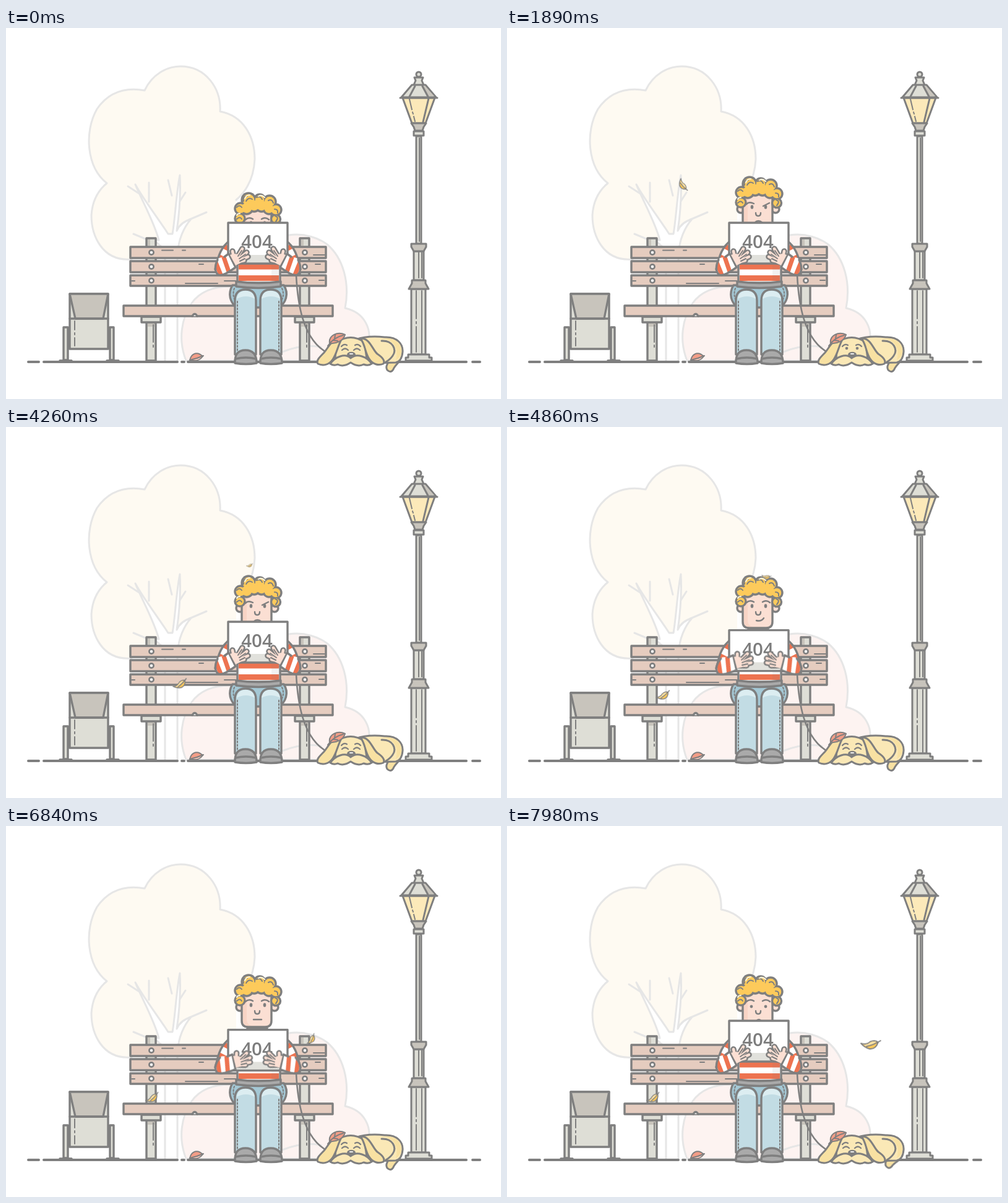
Animation, 800 px wide and 600 px high, one loop 8000 ms. Source, as an HTML page:

```html
<!DOCTYPE html>
<html lang="en">
<head>
<meta charset="utf-8">
<title>Park bench 404</title>
<style>
html, body { margin: 0; width: 100%; height: 100%; overflow: hidden; background: #fff; }
svg { display: block; width: 100vw; height: 100vh; }
.ink { stroke: #7f7f7f; stroke-width: 3.4; stroke-linecap: round; stroke-linejoin: round; fill: none; }
.thin { stroke-width: 2; }
.pale { stroke: #e6e6e6; stroke-width: 3; stroke-linecap: round; stroke-linejoin: round; fill: none; }
.wood { fill: #e5ccbf; } .metal { fill: #deded6; } .dark { fill: #c8c4bc; }
.skin { fill: #fbdfd3; } .denim { fill: #c2dce4; } .shade { fill: #a4c8d5; }
.shoe { fill: #aaa; } .fur { fill: #fae8b6; } .ear { fill: #f8e1a2; }
.glow { fill: #fce9b9; } .rust { fill: #f39d87; } .gold { fill: #fdca5b; }
.white { fill: #fff; } .none { stroke: none; }
.dot { fill: #7f7f7f; stroke: none; }
.red { stroke: #ed7350; fill: none; }

.move { animation: 8s linear infinite both; }
.head { animation-name: rise; }
.sign { animation-name: lower; }
.forearm { animation-name: swing; transform-origin: 345px 390px; }
.tail { animation-name: wag; transform-origin: 632px 532px; }
.nose { animation-name: sniff; }
.leaf1 { animation-name: fall1; }
.leaf2 { animation-name: fall2; }
.step { animation: 8s step-end infinite both; }
.calm { animation-name: calm; } .cross { animation-name: cross; }
.smirk { animation-name: smirk; } .flat { animation-name: flat; }
.eyes { animation-name: eyes; } .startled { animation-name: startled; }
.asleep { animation-name: asleep; } .awake { animation-name: awake; }

@keyframes rise {
  0%, 2.5% { transform: translateY(26px); animation-timing-function: ease-in-out; }
  9%, 100% { transform: none; }
}
@keyframes lower {
  0%, 55% { transform: none; animation-timing-function: ease-in-out; }
  62%, 86.5% { transform: translateY(14.5px); animation-timing-function: ease-in-out; }
  91%, 100% { transform: none; }
}
@keyframes swing {
  0%, 55% { transform: none; animation-timing-function: ease-in-out; }
  62%, 86.5% { transform: rotate(14.5deg); animation-timing-function: ease-in-out; }
  91%, 100% { transform: none; }
}
@keyframes wag {
  0%, 92% { transform: none; }
  95% { transform: rotate(14deg); }
  97.5% { transform: none; }
  100% { transform: rotate(13deg); }
}
@keyframes sniff {
  0%, 15%, 19%, 26%, 30%, 36%, 42%, 46%, 100% { transform: none; }
  17%, 28%, 39%, 44% { transform: translateY(-1px); }
}
@keyframes calm { 0% { opacity: 1; } 13% { opacity: 0; } 56% { opacity: 1; } }
@keyframes cross { 0% { opacity: 0; } 13% { opacity: 1; } 56% { opacity: 0; } }
@keyframes smirk { 0% { opacity: 0; } 56% { opacity: 1; } 79% { opacity: 0; } }
@keyframes flat { 0%, 79% { opacity: 0; } 79.01% { opacity: 1; } 93% { opacity: 0; } }
@keyframes eyes { 0% { opacity: 1; } 93% { opacity: 0; } }
@keyframes startled { 0% { opacity: 0; } 93% { opacity: 1; } }
@keyframes asleep { 0% { opacity: 1; } 16% { opacity: 0; } 45% { opacity: 1; } }
@keyframes awake { 0% { opacity: 0; } 16% { opacity: 1; } 45% { opacity: 0; } }
@keyframes fall1 {
  0% { transform: translate(284px, 163px) rotate(0deg) scale(0); }
  10% { transform: translate(286px, 195px) rotate(-25deg) scale(.3); }
  15.5% { transform: translate(270px, 219px) rotate(5deg) scale(.5); }
  20% { transform: translate(274px, 240px) rotate(40deg) scale(.65); }
  23.625% { transform: translate(284px, 254px) rotate(68deg) scale(.68); }
  30% { transform: translate(256px, 290px) rotate(35deg) scale(.72); }
  37.125% { transform: translate(225px, 330px) rotate(2deg) scale(.75); }
  41% { transform: translate(252px, 357px) rotate(-12deg) scale(.76); }
  48% { transform: translate(285px, 397px) rotate(-30deg) scale(.77); }
  53.25% { transform: translate(282px, 416px) rotate(-24deg) scale(.77); }
  61% { transform: translate(252px, 435px) rotate(-20deg) scale(.74); }
  68%, 100% { transform: translate(237px, 440px) rotate(-26deg) scale(.74); }
}
@keyframes fall2 {
  0%, 34% { transform: translate(358px, 181px) scale(0); }
  37.125% { transform: translate(362px, 188px) scale(.1); }
  41% { transform: translate(367px, 200px) rotate(20deg) scale(.18); }
  53.25% { transform: translate(394px, 224px) rotate(-14deg) scale(.33); }
  61% { transform: translate(420px, 243px) rotate(12deg) scale(.48); }
  71.25% { transform: translate(466px, 273px) rotate(0deg) scale(.64); }
  78.5% { transform: translate(496px, 306px) rotate(-22deg) scale(.66); }
  85.5% { transform: translate(494px, 345px) rotate(-48deg) scale(.6); }
  91.3% { transform: translate(515px, 368px) rotate(-26deg) scale(.8); }
  100% { transform: translate(590px, 353px) rotate(0deg) scale(1); }
}
</style>
</head>
<body>
<svg viewBox="0 0 800 600" preserveAspectRatio="none">
  <defs>
    <clipPath id="sleeve"><path d="M360 365L371 387C361 394 350 402 343 399C336 394 338 382 344 372Q350 371 360 365Z"/></clipPath>
    <clipPath id="upper"><path d="M366 341C352 349 344 364 341 380L338 393L350 400L368 390Z"/></clipPath>
    <g id="leaf" class="ink thin">
      <path class="gold" d="M-16-2Q-7 1-1-4.500Q7-8 12-3.500Q8 8-2 7Q-10 5-16-2Z"/>
      <path class="none" fill="#fde3a5" d="M-14-1Q-7 2-1-3.500Q5-6 9-4Q2 2-7 3Z"/>
      <path d="M-7 3Q4 1 16-6"/>
    </g>
  </defs>

  <!-- tree and bush -->
  <path class="none" fill="#fefaf2" d="M195 374C155 376 138 335 138 303Q140 270 163 251C130 225 126 168 147 131Q174 92 224 101C236 75 260 62 282 62C323 62 348 98 346 135C384 142 402 176 402 212Q400 254 372 278V374Z"/>
  <path class="pale" d="M203 374C155 378 138 335 138 303Q140 270 163 251C130 225 126 168 147 131Q174 92 224 101C236 75 260 62 282 62C323 62 348 98 346 135C384 142 402 176 402 212Q400 254 372 278"/>
  <path class="pale" d="M231 250V281M197 256L214 267M262 246L268 271M290 266L274 291M324 298L296 310M206 333L230 343"/>
  <path class="pale white" d="M257 538V365Q253 349 229 340L247 343C240 315 220 280 209 253C222 277 244 305 262 333H269C274 303 275 268 281 238Q283 280 276 328Q282 314 299 309Q280 331 277 365V538"/>
  <path class="pale" fill="#fdf3f1" style="fill:#fdf3f1" d="M291 538C278 505 283 470 300 445Q320 417 365 418L410 365C435 325 490 328 519 350C545 372 556 412 548 453C580 460 592 488 585 512L578 538Z"/>
  <path class="pale" d="M446 524Q481 510 509 516"/>

  <path class="ink" style="stroke-width:4" d="M36 540H53M61 540H277M284 540H288M294 540H744M754 540H766"/>

  <!-- bin -->
  <g class="ink">
    <path class="metal" d="M93 484H100V537H93ZM168 484H174V537H168ZM103 430H165V519H103Z"/>
    <path class="dark" d="M103 430H165L157 470H112Z"/>
    <path d="M103 470H165M87 538H106M163 538H182"/>
    <path class="thin" d="M111 474V488M111 493V496M111 501V514"/>
  </g>

  <!-- lamp -->
  <g class="ink" style="stroke-width:3">
    <circle class="metal" cx="667" cy="75" r="4"/>
    <path class="metal" d="M660 80H674L672 85L675 92H659L662 85ZM656 92H678L695 112H639Z"/>
    <path class="dark none" d="M671 94H677L692 110H680Z"/>
    <path class="glow" d="M641 113H693L678 154H656Z"/>
    <path d="M637 113H697M661 94L652 111M673 94L682 111M683 114L674 152"/>
    <path class="thin" d="M652 115L656 132M657 136L658 139M659 143L661 151"/>
    <path class="dark" d="M655 154H679L675 160L673 166H661L659 160Z"/>
    <path class="metal" d="M659 167H675V174H659ZM663 175H671V349H663ZM659 361H675V408H659ZM655 422H678V528H655Z"/>
    <path class="dark" d="M655 349H679V354L675 361H659L655 354ZM656 408H678V413L683 422H651L656 413Z"/>
    <path class="metal" d="M650 528H684V533H688V538H646V533H650Z"/>
    <path class="thin" d="M667 363V404M672 363V404M663 425V470M663 475V478M663 483V524M672 425V526M668 178V345"/>
  </g>

  <!-- bench -->
  <g class="ink">
    <path class="metal" d="M227 340H242V538H227ZM475 340H490V538H475Z"/>
    <path class="none dark" d="M229 477H240V483H229ZM477 477H488V483H477ZM229 342H233V352H229ZM477 342H481V352H477Z"/>
    <path class="wood" d="M201 354H517V372H201ZM201 377H517V395H201ZM201 400H517V417H201ZM190 449H528V466H190Z"/>
    <path class="metal" d="M219 467H250V476H219ZM467 467H498V476H467Z"/>
    <path class="thin" d="M252 359.500H270M285 359.500H290M312 382H319M290 413H342M353 409H371M203 409H208M497 367H515M500 382H508M506 408H514M238 480V508M238 513V516M486 480V508M486 513V516"/>
    <path class="white" d="M301 466Q305 459 309 466"/>
    <g id="bolts" class="white" style="stroke-width:2.700"></g>
  </g>

  <!-- fallen leaf -->
  <g class="ink thin">
    <path class="rust" d="M297 537C300 525 310 523 318 531C312 539 304 539 297 537Z"/>
    <path class="none" fill="#f9d2c8" d="M300 535Q308 537 316 532Q309 540 300 535Z"/>
    <path d="M297 537Q308 535 319 530"/>
  </g>

  <!-- seated figure -->
  <g class="ink">
    <path class="shade" d="M366 416C358 430 362 444 373 452H441C452 445 458 430 449 416Z"/>
    <path class="thin" stroke-dasharray="2.500 3" d="M369 421Q365 433 371 442M446 421Q451 433 444 442"/>
    <path class="denim" d="M370 528V441Q370 423 387 423Q404 423 404 441V528ZM411 528V441Q411 423 428 423Q445 423 445 441V528Z"/>
    <path class="none" fill="#dcedf1" d="M373 438Q375 425 388 425Q400 426 402 438Q388 430 373 438ZM413 438Q415 425 428 425Q441 426 443 438Q428 430 413 438Z"/>
    <path class="thin" stroke-dasharray="2.500 3" d="M374 442V526M441 442V526"/>
    <path class="shoe" d="M370 542Q369 521 387 521Q405 521 405 542Q388 545 370 542ZM411 542Q410 521 428 521Q446 521 446 542Q428 545 411 542Z"/>
    <path d="M371 535Q388 531 404 535M412 535Q428 531 445 535"/>
    <path class="white" d="M374 412V345H443V412Z"/>
    <path class="red" stroke-width="9" stroke-linecap="butt" style="stroke-width:9;stroke-linecap:butt" d="M376 386H441M376 404.500H441"/>
    <path class="none" fill="#7f7f7f" opacity=".1" d="M429 383H441V409H429Z"/>
    <path class="shoe" d="M372 410Q408 415 444 410V418Q408 423 372 418Z"/>
    <path class="skin" d="M394 318H418V345H394Z"/>
    <path class="white" d="M390 327H422V338H390Z"/>
  </g>

  <g class="move head">
    <g class="ink">
      <circle class="skin" cx="378" cy="293" r="6"/><circle class="skin" cx="434" cy="293" r="6"/>
      <path class="skin" d="M381 265H429V315Q429 325 419 325H391Q381 325 381 315Z"/>
      <path class="none" fill="#f6cdbd" d="M383 276H389V314Q390 322 397 323H391Q383 323 383 314Z" opacity=".6"/>
    </g>
    <g id="hair"></g>
    <g class="ink thin">
      <path d="M384 254Q382 246 390 246M388 254Q392 247 398 251M405 248Q411 245 414 251M424 253Q430 250 432 257M373 264Q377 259 381 264M373 283Q378 278 381 283M434 267Q440 267 439 273M435 278Q442 280 436 287"/>
      <path stroke="#fff" style="stroke:#fff5d8" d="M386 250Q388 244 394 244M408 246Q413 243 418 248M373 277Q374 274 378 274"/>
    </g>
    <g class="ink" style="stroke-width:2.400">
      <path d="M402 299Q402 304 406 304Q410 304 410 299"/>
      <path class="step calm" d="M387 284Q393 279 399 283M413 283Q419 279 425 284"/>
      <path class="step cross" d="M387 285Q391 280 399 284M414 288L424 283"/>
      <path class="step cross" d="M400 315Q406 309 413 315"/>
      <path class="step smirk" d="M403 313Q411 315 415 309"/>
      <path class="step flat" d="M400 313H413"/>
      <g class="step eyes"><ellipse class="dot" cx="396" cy="289.500" rx="2.300" ry="3.200"/><ellipse class="dot" cx="418" cy="289.500" rx="2.300" ry="3.200"/></g>
      <g class="step startled"><circle class="dot" cx="395" cy="292" r="2.400"/><circle class="dot" cx="418" cy="292" r="2.400"/><circle fill="#d9a79c" cx="407" cy="317" r="4"/></g>
    </g>
  </g>

  <g id="upperArm">
    <path class="white" d="M366 341C352 349 344 364 341 380L338 393L350 400L368 390Z"/>
    <path class="red" stroke-width="8" clip-path="url(#upper)" d="M340 347L370 362M334 365L366 381"/>
    <path class="ink" d="M366 341C352 349 344 364 341 380L338 390"/>
  </g>
  <path class="ink thin" d="M469 378V400C471 440 478 505 521 526" style="stroke-width:2.600"/>

  <g class="move sign">
    <path class="white none" d="M359 315H455V381H359Z"/>
    <path fill="#e1e1dc" d="M361 367H453V380H361Z"/>
    <path class="ink" d="M359 315H455V381H359Z"/>
    <text x="405.500" y="356" text-anchor="middle" font-family="'Open Sans', 'Noto Sans', sans-serif" font-size="29.500" font-weight="600" fill="#7c7c7c">404</text>
  </g>

  <g id="lowerArm"><g class="move forearm">
    <path class="white" d="M360 365L371 387C361 394 350 402 343 399C336 394 338 382 344 372Q350 371 360 365Z"/>
    <path class="red" stroke-width="7" clip-path="url(#sleeve)" d="M337 374L349 404M350 365L361 397M364 359L374 390"/>
    <path class="ink" d="M360 365L371 387C361 394 350 402 343 399C336 394 338 382 342 375M360 365L353 370"/>
    <g fill="none" stroke-linecap="round" stroke-linejoin="round" class="hand">
      <path stroke="#7f7f7f" stroke-width="9.500" d="M369 375L366 361M372 374L382 357M374 375L389 363M375 377L391 370M372 379L385 376"/>
      <path fill="#fbdfd3" stroke="#fbdfd3" stroke-width="4.500" d="M369 375L366 361M372 374L382 357M374 375L389 363M375 377L391 370M372 379L385 376"/>
      <path fill="#fbdfd3" d="M362 367L371 384L379 380L376 366L368 365Z"/>
      <path class="ink thin" d="M375 369L381 360M377 373L387 366M378 377L386 373"/>
    </g>
  </g></g>

  <!-- dog -->
  <g class="ink" style="stroke-width:3">
    <g class="move tail">
      <path class="ear" d="M639 530C638 541 629 544 626 552Q622 559 616 553C612 546 619 541 622 532Z"/>
    </g>
    <path class="fur" d="M565 504C584 497 603 499 612 500C632 499 642 511 641 524C640 536 634 540 630 541L590 542Z"/>
    <path d="M607 506C625 505 632 520 625 530Q621 536 614 540"/>
    <path class="none ear" d="M612 502C632 501 640 513 639 525Q637 533 630 537C635 519 628 507 612 502Z"/>
    <path class="fur" d="M535 508Q557 493 579 508L584 541H531Z"/>
    <path class="ear" d="M543 502C527 501 521 517 514 525C506 533 501 538 504 543C512 547 522 545 528 536C535 526 536 514 543 502Z"/>
    <path class="ear" d="M573 502C588 501 592 520 600 527C609 533 613 538 610 543C601 547 592 543 587 535C580 525 581 513 573 502Z"/>
    <path class="fur" d="M557 534C548 525 532 532 524 543Q530 547 536 544Q545 549 557 541Q569 549 578 544Q585 547 591 543C584 532 567 525 557 534Z"/>
    <path class="step asleep" d="M543 521Q548 516 553 521M562 521Q567 516 572 521M542 515Q546 510 551 513M564 513Q569 510 573 515" style="stroke-width:2.200"/>
    <g class="step awake" style="stroke-width:2.200">
      <path d="M542 515Q546 510 551 513M564 513Q569 510 573 515"/>
      <circle class="dot" cx="549" cy="518" r="2.300"/><circle class="dot" cx="566" cy="518" r="2.300"/>
    </g>
    <ellipse class="move nose dot" cx="558" cy="528.500" rx="7" ry="4.800"/>
    <path stroke="#fff" class="move nose" style="stroke:#eee;stroke-width:2" d="M556 527H560"/>
    <g class="thin">
      <path class="rust" d="M523 510C521 497 536 490 548 496C545 506 534 511 523 510Z"/>
      <path d="M520 514Q530 500 545 497M531 503L532 496M529 505L536 506"/>
    </g>
  </g>

  <g class="move leaf1"><use href="#leaf"/></g>
  <g class="move leaf2"><use href="#leaf"/></g>
</svg>
<script>
const byId = id => document.getElementById(id);
const circle = (x, y, r, fill) => `<circle cx="${x}" cy="${y}" r="${r}"${fill ? ` fill="${fill}"` : ''}/>`;

byId('bolts').innerHTML = [235, 483]
  .flatMap(x => [363, 386, 408.5].map(y => circle(x, y, 3.6))).join('');

// Overlapping curls: one ink layer below one gold layer gives a merged outline.
const curls = [
  [378, 282, 8], [379, 266, 9], [392, 252, 11], [410, 252, 9], [426, 255, 10],
  [436, 268, 9], [436, 283, 7.5], [389, 265, 10], [401, 261, 10], [413, 261, 10], [425, 266, 9]
];
const layer = (grow, fill) => curls.map(([x, y, r]) => circle(x, y, r + grow, fill)).join('');
byId('hair').innerHTML = layer(1.7, '#7f7f7f') + layer(-1.7, '#fdca5b');

// The right arm mirrors the left one.
for (const id of ['upperArm', 'lowerArm']) {
  const twin = byId(id).cloneNode(true);
  twin.removeAttribute('id');
  twin.setAttribute('transform', 'matrix(-1 0 0 1 814 0)');
  byId(id).after(twin);
}
</script>
</body>
</html>
```
